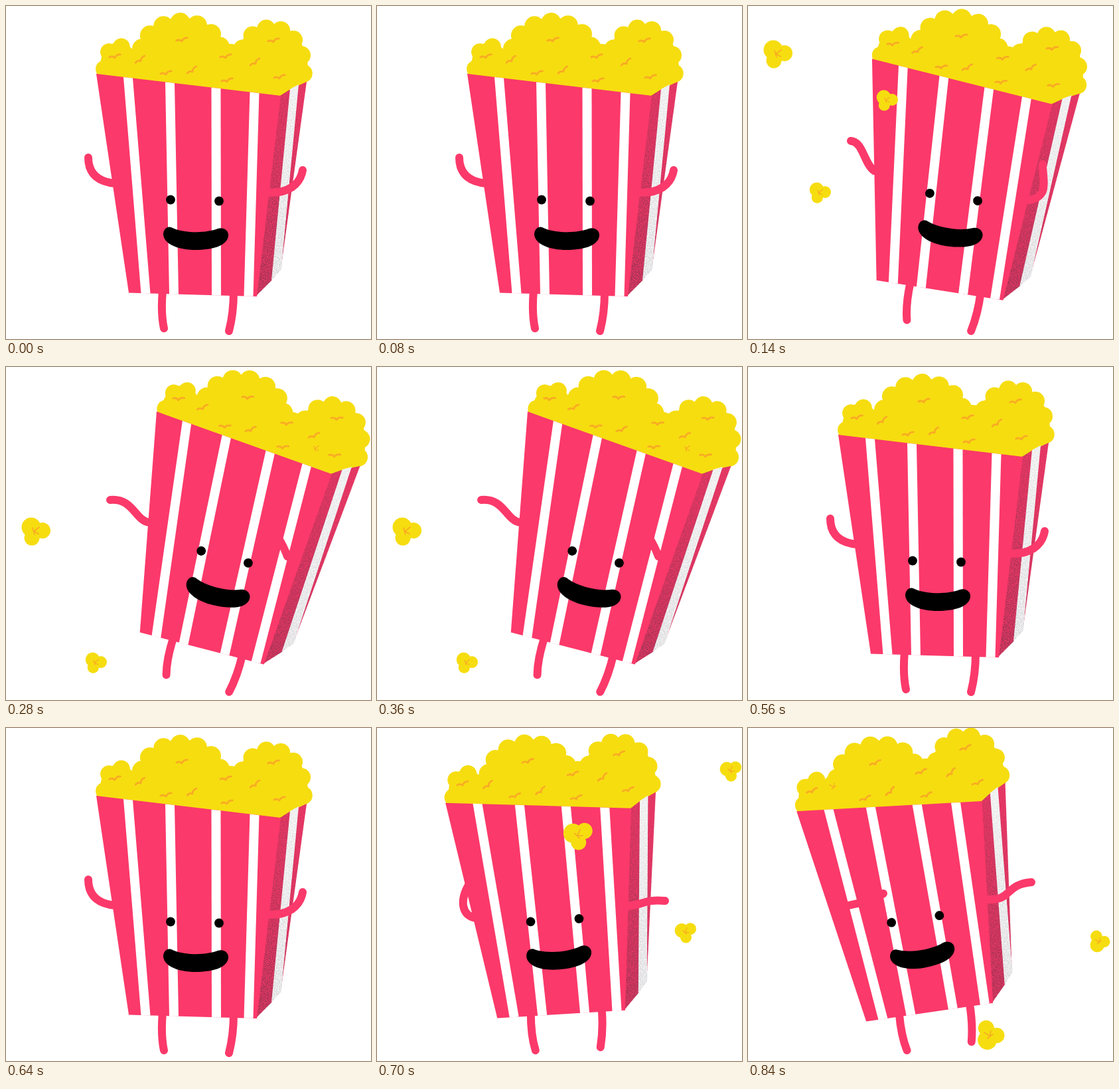
Animation, 550 px wide and 501 px high, one loop 0.98 s. Source, as an HTML page:

```html
<!DOCTYPE html>
<html lang="en">
<head>
<meta charset="utf-8">
<title>Dancing popcorn</title>
<style>
  html, body { margin: 0; width: 100%; height: 100%; overflow: hidden; background: #fff; }
  svg { display: block; width: 550px; height: 501px; }
  .pink { fill: #fb396a; }
  .white { fill: #fff; }
  .corn { fill: #f6dd10; }
  .limb { fill: none; stroke: #fb396a; stroke-width: 12; stroke-linecap: round; }
  .mark { fill: none; stroke: #f9ab24; stroke-width: 2.8; stroke-linecap: round; stroke-linejoin: round; }
  .thin { stroke-width: 1.7; }
</style>
</head>
<body>
<svg viewBox="0 0 550 501">
  <defs>
    <linearGradient id="shade" x1="0" y1="0" x2="0" y2="1">
      <stop offset="0" stop-opacity=".55"/>
      <stop offset="1"/>
    </linearGradient>
    <filter id="grain" x="0" y="0" width="1" height="1" color-interpolation-filters="sRGB">
      <feTurbulence type="fractalNoise" baseFrequency=".7" numOctaves="2" seed="4"/>
      <feColorMatrix values="0 0 0 0 .2  0 0 0 0 .17  0 0 0 0 .22  0 0 0 2.2 -.6"/>
      <feComposite operator="in" in2="SourceAlpha"/>
    </filter>
    <g id="kernel">
      <g class="corn">
        <circle r="13"/>
        <circle cx="-6" cy="-5" r="14.500"/>
        <circle cx="11" r="12"/>
        <circle cx="-5" cy="11" r="11.500"/>
      </g>
      <path class="mark thin" d="M-4-4L-1 6M6-5L-2 1L5 5"/>
    </g>
  </defs>
  <g id="body">
    <path class="limb" d="M236 428Q233 462 238 485M343 430Q343 462 336 489"/>
    <g id="corn" class="corn">
      <path d="M136 103L414 136L453 115L440 70L339 57L187 64L145 85Z"/>
    </g>
    <g id="creases" class="mark"></g>
    <g id="side"></g>
    <path class="pink" d="M136 102L414 135L378 437L185 431.500Z"/>
    <g id="stripes" class="white"></g>
    <circle cx="248" cy="291.500" r="6.900"/>
    <circle cx="321" cy="293.500" r="6.900"/>
    <path d="M237 344C237 334 245 330 251 334C270 342 301 342 319 335C328 332 336 338 335 346C333 361 311 367 285 367C257 367 238 357 237 344Z"/>
  </g>
  <path id="arms" class="limb"/>
  <g id="kernels"></g>
</svg>
<script>
const HOLD = 140;
const LEFT_FOOT = [239, 476];
const RIGHT_FOOT = [337, 490];
const $ = id => document.getElementById(id);

function add(parent, tag, attrs) {
  const node = document.createElementNS('http://www.w3.org/2000/svg', tag);
  for (const key in attrs) node.setAttribute(key, attrs[key]);
  return parent.appendChild(node);
}

// Flat colour with grain that thickens towards the bottom
function shaded(d, cls, opacity) {
  add($('side'), 'path', { d, class: cls });
  add($('side'), 'path', { d, fill: 'url(#shade)', filter: 'url(#grain)', opacity });
}
shaded('M413 135L429 125L401 412L376 437Z', 'pink', 0.56);
shaded('M440 120L453 114L417 375L415 390Z', 'pink', 0.4);
shaded('M428 125L441 118L417 370L415 396L400 413Z', 'white', 0.24);

// A stripe runs between the slanted top and bottom edges of the front
function stripe(top, bottom) {
  const topY = 102 + (top - 136) * 0.119;
  const bottomY = 431.5 + (bottom - 185) * 0.0285;
  add($('stripes'), 'path', {
    d: `M${top} ${topY}l14 1.700L${bottom + 14} ${bottomY + 0.4}H${bottom}Z`
  });
}
stripe(177, 203.5);
stripe(240, 246);
stripe(309.5, 310);
stripe(367.5, 358.5);

// A hill is an ellipse rimmed with evenly spread puffs
function hill(cx, cy, rx, ry, from, to, count, r) {
  add($('corn'), 'ellipse', { cx, cy, rx: rx - r / 2, ry: ry - r / 2 });
  for (let i = 0; i < count; i++) {
    const angle = (from + (to - from) * i / (count - 1)) * Math.PI / 180;
    add($('corn'), 'circle', {
      cx: cx + (rx - r) * Math.cos(angle), cy: cy - (ry - r) * Math.sin(angle), r
    });
  }
}
hill(170, 92, 35, 44, 185, 80, 3, 13);
hill(264, 78, 76, 68, 165, 18, 7, 15);
hill(399, 95, 63, 75, 150, -6, 7, 14);

// Every third crease leans more, starting with the second
'164,78 203,83 241,103 265,53 281,99 331,78 333,114 376,87 403,54 412,109'
  .split(' ').forEach((at, i) => {
    const lean = -30 * Math.cos((i - 1) * Math.PI / 3) ** 2;
    add($('creases'), 'path', {
      d: 'M-8-2Q-3-4 0 0Q3-5 9-4', transform: `translate(${at}) rotate(${lean})`
    });
  });

// Held poses; the first kernel is the largest and all share one turn
const rest = {
  tilt: 0, turn: 0, kernels: [],
  arms: 'M124 228C124 255 142 265 165 267M447 247C443 270 424 281 398 281'
};
const poses = [
  rest,
  {
    tilt: 7.3, turn: 0, kernels: [[44, 71], [209, 141], [108, 280]],
    arms: 'M155 203C174 205 174 236 190 248M444 238C444 262 455 286 424 292'
  },
  {
    tilt: 12.8, turn: 0, kernels: [[44, 246], [135, 444], [467, 122]],
    arms: 'M157 200C192 197 194 231 216 234M408 254Q417 266 424 285'
  },
  {
    tilt: 7.1, turn: -28, kernels: [[21, 344], [188, 484], [350, 48]],
    arms: 'M149 215C157 235 172 243 192 247M385 246Q394 262 402 280'
  },
  rest,
  {
    tilt: -5.1, turn: -28, kernels: [[303, 160], [533, 63], [465, 306]],
    arms: 'M148 286C126 281 126 258 137 238M378 268C400 266 405 257 434 260'
  },
  {
    tilt: -9.9, turn: -112, kernels: [[363, 462], [528, 321], [128, 88]],
    arms: 'M142 269L170 263Q190 260 204 249M362 258C397 260 388 235 427 232'
  }
];

let shown = -1;
function draw(time) {
  const step = Math.floor(time / HOLD) % poses.length;
  if (step === shown) return;
  shown = step;
  const { tilt, turn, kernels, arms } = poses[step];
  const foot = tilt > 0 ? RIGHT_FOOT : LEFT_FOOT;
  $('body').setAttribute('transform', `rotate(${tilt} ${foot})`);
  $('arms').setAttribute('d', arms);
  $('kernels').replaceChildren();
  kernels.forEach((at, i) => add($('kernels'), 'use', {
    href: '#kernel', transform: `translate(${at}) rotate(${turn}) scale(${i ? 0.74 : 1})`
  }));
}

const start = performance.now();
function tick() {
  draw(performance.now() - start);
  requestAnimationFrame(tick);
}
tick();
</script>
</body>
</html>
```
